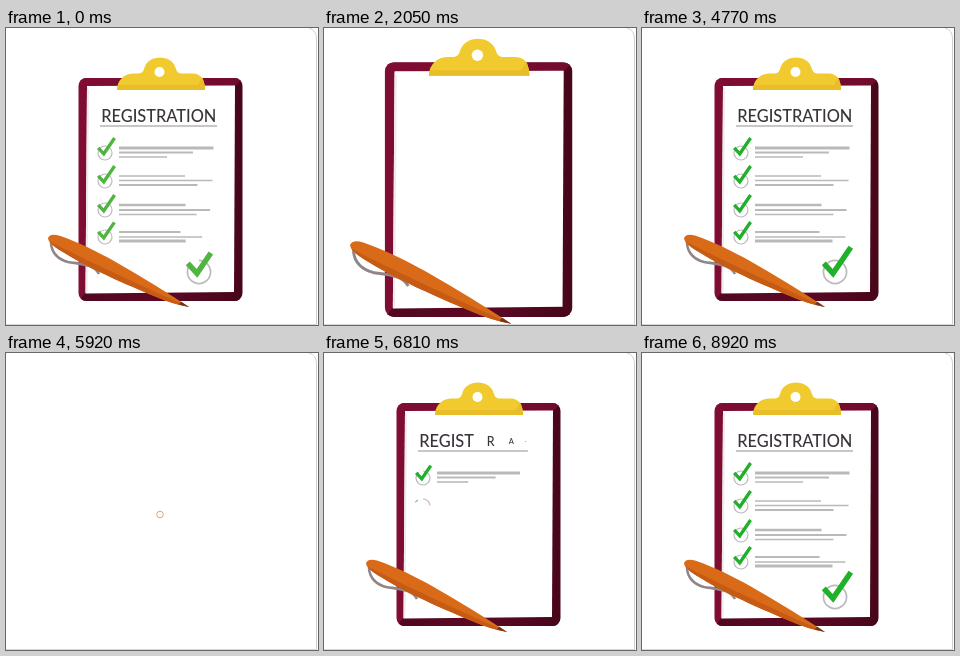
Write an HTML page with a canvas that moves like this. It is 312 by 297 pixels and loops after 9860 ms.

```html
<!DOCTYPE html>
<html lang="en">
<head>
<meta charset="utf-8">
<title>Registration</title>
<style>
html, body { margin: 0; width: 100%; height: 100%; overflow: hidden; background: #fff; }
canvas { display: block; width: 312px; height: 297px; }
</style>
</head>
<body>
<canvas id="stage" width="312" height="297"></canvas>
<script>
const ctx = document.getElementById('stage').getContext('2d');
const LOOP = 9860, CUTS = [1700, 5920], LEAD = 2400;
const CX = 154, CY = 161;
const TITLE = 'REGISTRATION';

// Each row: circle centre y, then [y, right end, thickness] per line
const ROWS = [
  [125, [120, 207.5, 2.8], [124.5, 187, 2.2], [129, 161, 1.6]],
  [153, [148, 179, 1.6], [152.5, 206.5, 1.5], [157, 191.5, 1.9]],
  [182, [177, 179.5, 2.5], [182, 204.5, 2.2], [186.5, 191.5, 1.6]],
  [209, [204, 177.5, 2], [209, 203.5, 1.4], [213, 190.5, 2.9]]
];

const clamp = v => Math.max(0, Math.min(1, v));
const settle = ms => clamp(1.007 * (1 - Math.exp(-Math.max(0, ms) / 190)));

function popScale(ms) {
  const q = clamp(ms / 640) - 1, s = 2.1;
  return Math.max(0.03, 1 + (s + 1) * q ** 3 + s * q * q);
}

function fade(x0, y0, x1, y1, ...colors) {
  const g = ctx.createLinearGradient(x0, y0, x1, y1);
  colors.forEach((c, i) => g.addColorStop(i / (colors.length - 1), c));
  return g;
}

function fill(d, color) {
  ctx.fillStyle = color;
  ctx.fill(new Path2D(d));
}

function stroke(d, color, width) {
  ctx.strokeStyle = color;
  ctx.lineWidth = width;
  ctx.stroke(new Path2D(d));
}

function drawBorder() {
  stroke('M303 0Q310.5 2 310.5 11V297', '#cfcfcf', 1);
  stroke('M0 296.5H311', '#d6d6d6', 1);
}

function drawBoard() {
  ctx.save();
  ctx.beginPath();
  ctx.roundRect(72.5, 50, 164, 223, 8);
  ctx.clip();
  fill('M72 50H237V274H72Z', fade(72, 0, 237, 0, '#800d33', '#6d0b2d', '#470619'));
  fill('M72 50H237L229 58H80Z', fade(72, 0, 237, 0, '#800d33', '#720b2d'));
  fill('M72 274H237L228 264H80Z', fade(72, 0, 237, 0, '#4f0820', '#5d0925', '#470619'));
  ctx.restore();
  fill('M81 58L229 57.5L228 264L79.5 265.5Z', '#fff');
  fill('M81 59L83 62L81.5 264L79.5 265Z', '#eeebec');
  fill('M111 62Q111 54 117 49Q121 45.5 128 45.5H133Q137 45 138 41C140 33 147 29.5 154 29.5' +
    'C161 29.5 168 33 170 41Q171 45 175 45.5H187Q193 45.5 197 51Q199 56 199 62Z', '#f0ca2e');
  fill('M112 57H192L196 50Q199 55 199 62H111Z', '#e8bd29');
  fill('M148.5 44a5 5 0 1 0 10 0a5 5 0 1 0 -10 0Z', '#fff');
}

function drawTitle(ms) {
  const underline = settle(ms - 380);
  if (underline) stroke(`M94 98H${94 + 117 * underline}`, '#b4b4b4', 1.4);
  ctx.font = '500 16.4px Lato, sans-serif';
  ctx.textAlign = 'center';
  ctx.fillStyle = '#3a343a';
  const left = 152.8 - ctx.measureText(TITLE).width / 2;
  [...TITLE].forEach((ch, i) => {
    const p = clamp((ms - 380 - 60 * i) / 200);
    if (!p) return;
    const end = ctx.measureText(TITLE.slice(0, i + 1)).width;
    const x = left + end - ctx.measureText(ch).width / 2;
    ctx.save();
    ctx.translate(x + 27 * (1 - p * p), 88);
    ctx.scale(p, p);
    ctx.fillText(ch, 0, 6);
    ctx.restore();
  });
}

function drawTick(x, y, size, ms, color) {
  const ring = settle(ms), mark = settle(ms - 45);
  if (ring) {
    ctx.beginPath();
    ctx.arc(x, y, 7 * size, -Math.PI / 2, (2 * ring - 0.5) * Math.PI);
    ctx.strokeStyle = '#bdbabd';
    ctx.lineWidth = size > 1 ? 1.7 : 1.2;
    ctx.stroke();
  }
  if (!mark) return;
  const pts = [[-6.8, -5.2], [-1.2, 0.8], [9.6, -15]].map(([a, b]) => [x + a * size, y + b * size]);
  const len = size * (Math.hypot(5.6, 6) + Math.hypot(10.8, 15.8));
  ctx.setLineDash([len * mark, len * 2]);
  stroke('M' + pts.join('L'), color, 3.3 * size);
  ctx.setLineDash([]);
}

function drawRows(ms, green) {
  ROWS.forEach(([y, ...lines], r) => {
    const lineStart = r ? 1060 + 390 * (r - 1) : 500;
    lines.forEach(([ly, end, width], i) => {
      const p = settle(ms - lineStart - 97 * i);
      if (p) stroke(`M113 ${ly}H${113 + (end - 113) * p}`, '#b9b9b9', width);
    });
    drawTick(99, y, 1, ms - 450 - 390 * r, green);
  });
  drawTick(193, 244, 1.65, ms - 2010, green);
}

function drawPen() {
  stroke('M45 214C45 226 54 232 62 234C74 236 88 236 93 246', '#928589', 2.6);
  fill('M42 210Q44 205 53 207.5C72 214 92 224 108 233Q150 257 183 279' +
    'Q166 276 148 268C112 253 74 236 49 219Q42 214 42 210Z', '#d96b18');
  fill('M43 213C70 227 116 249 183 279Q166 276 148 268C112 253 74 236 49 219Z', '#c55b14');
  fill('M175 273.5L183 279L173 276.5Z', '#70351f');
}

function draw(t) {
  const start = t < CUTS[0] ? -LEAD : t < CUTS[1] ? CUTS[0] : CUTS[1];
  const ms = t - start;
  ctx.clearRect(0, 0, 312, 297);
  drawBorder();
  if (ms < 70) {
    ctx.beginPath();
    ctx.arc(CX, CY + 0.5, 3.3, 0, 2 * Math.PI);
    ctx.strokeStyle = '#dca57c';
    ctx.lineWidth = 1;
    ctx.stroke();
    return;
  }
  const s = popScale(ms);
  ctx.save();
  ctx.translate(CX, CY);
  ctx.scale(s, s);
  ctx.translate(-CX, -CY);
  drawBoard();
  drawTitle(ms);
  drawRows(ms, t < CUTS[0] ? '#50b53f' : '#20b02a');
  drawPen();
  ctx.restore();
}

const begun = performance.now();
function tick() {
  draw((performance.now() - begun) % LOOP);
  requestAnimationFrame(tick);
}
tick();
</script>
</body>
</html>
```
